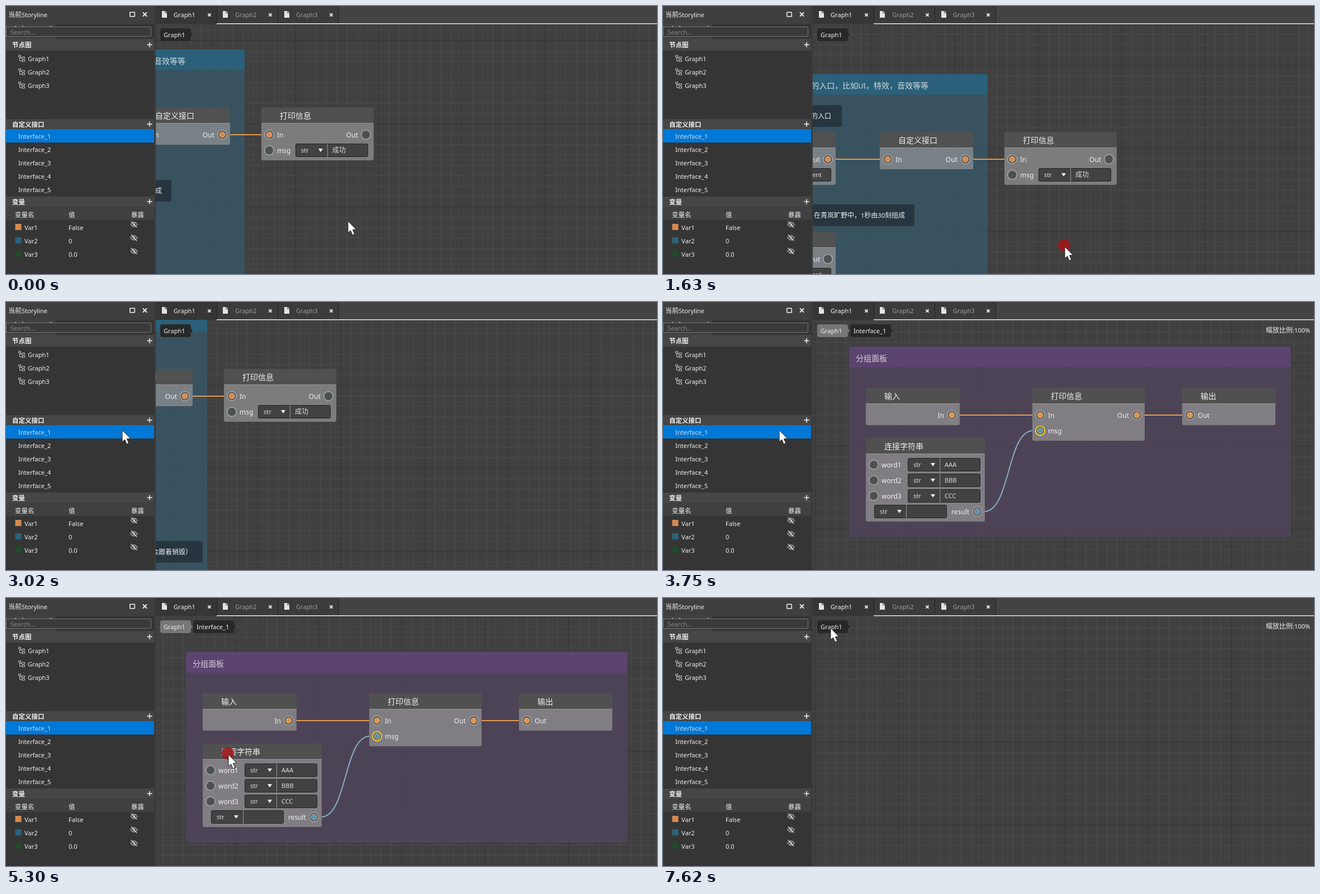
Animation, 1165 px wide and 481 px high, one loop 8 s. Source, as an HTML page with a canvas:

```html
<!DOCTYPE html>
<html lang="zh-CN">
<head>
<meta charset="utf-8">
<title>Node editor</title>
<style>
html, body { margin: 0; height: 100%; overflow: hidden; background: #404040; }
canvas { display: block; }
</style>
</head>
<body>
<canvas id="stage" width="1165" height="481"></canvas>
<script>
const c = document.getElementById('stage').getContext('2d');
const LOOP = 8000, ORANGE = '#e6994a';

// Position keys: [time, x, y]
const mouse = [[790, 612, 386], [860, 634, 368], [1280, 676, 255], [1630, 719, 432],
  [2330, 500, 326], [2400, 513, 312], [3020, 208, 230], [4540, 208, 230], [4950, 409, 264],
  [5020, 409, 264], [5700, 382, 306], [5930, 336, 287], [6190, 336, 287],
  [6500, 372, 190], [6960, 300, 54]];
const mainView = [[860, 457, 182], [1280, 499, 69], [1630, 611, 226], [2330, 390, 120]];
const innerView = [[5020, 333, 80], [5700, 306, 122]];
const presses = [[860, 2330], [3480, 3550], [3620, 3690], [4880, 5700]];

function at(keys, t) {
  if (t <= keys[0][0]) return keys[0].slice(1);
  for (let i = 1; i < keys.length; i++) {
    const [t0, x0, y0] = keys[i - 1], [t1, x1, y1] = keys[i];
    if (t < t1) {
      const k = (t - t0) / (t1 - t0);
      return [Math.round(x0 + (x1 - x0) * k), Math.round(y0 + (y1 - y0) * k)];
    }
  }
  return keys[keys.length - 1].slice(1);
}

function rect(x, y, w, h, fill, r = 0, stroke) {
  c.beginPath();
  c.roundRect(x, y, w, h, r);
  if (fill) { c.fillStyle = fill; c.fill(); }
  if (stroke) { c.strokeStyle = stroke; c.lineWidth = 1; c.stroke(); }
}

function disc(x, y, r, fill, stroke, width = 1.5) {
  c.beginPath();
  c.arc(x, y, r, 0, 7);
  c.fillStyle = fill;
  c.fill();
  if (stroke) { c.strokeStyle = stroke; c.lineWidth = width; c.stroke(); }
}

function path(points, color, width = 1) {
  c.beginPath();
  for (let i = 0; i < points.length; i += 2) c.lineTo(points[i], points[i + 1]);
  c.strokeStyle = color;
  c.lineWidth = width;
  c.stroke();
}

function shape(points, fill) {
  c.beginPath();
  for (let i = 0; i < points.length; i += 2) c.lineTo(points[i], points[i + 1]);
  c.closePath();
  c.fillStyle = fill;
  c.fill();
}

// Latin runs are set slightly smaller than the Chinese ones; y is the middle of the line
function text(s, x, y, { size = 12, color = '#f0f0f0', right = false, bold = '' } = {}) {
  const runs = s.match(/[\x00-\xff]+|[^\x00-\xff]+/g).map(part => {
    const font = part.charCodeAt(0) < 256
      ? `${bold} ${size * .925}px "Noto Sans", sans-serif`
      : `${bold} ${size}px "Noto Sans CJK SC", "Noto Sans CJK", sans-serif`;
    c.font = font;
    return { part, font, w: c.measureText(part).width };
  });
  if (right) x -= runs.reduce((sum, r) => sum + r.w, 0);
  c.fillStyle = color;
  for (const r of runs) {
    c.font = r.font;
    c.fillText(r.part, x, y + size * .36);
    x += r.w;
  }
}

function cross(x, y, r, color = '#eee', width = 1.8) {
  path([x - r, y - r, x + r, y + r], color, width);
  path([x - r, y + r, x + r, y - r], color, width);
}

function plus(x, y) {
  path([x - 4.5, y, x + 4.5, y], '#eee', 1.6);
  path([x, y - 4.5, x, y + 4.5], '#eee', 1.6);
}

function grid(ox, oy) {
  const step = 149 / 8;
  const lines = (o, from, to, draw) => {
    const first = Math.ceil((from - o) / step);
    for (const major of [false, true])
      for (let i = first; o + i * step < to; i++)
        if ((i % 8 === 0) === major) draw(Math.round(o + i * step), major ? '#343434' : '#4b4b4b');
  };
  rect(268, 32, 897, 449, '#404040');
  lines(ox, 268, 1165, (x, col) => rect(x, 33, 1, 448, col));
  lines(oy, 33, 481, (y, col) => rect(268, y, 897, 1, col));
}

function group(x, y, w, h, body, head) {
  rect(x, y, w, h, body, 4);
  rect(x, y, w, 37, head, [4, 4, 0, 0]);
}

function node(x, y, w, h, title) {
  rect(x, y, w, h, 'rgba(150,150,150,.7)', 3);
  rect(x, y, w, 28, 'rgba(78,78,78,.94)', [3, 3, 0, 0]);
  rect(x, y + 28, w, 1, '#989898');
  text(title, x + 33, y + 15, { size: 14 });
}

function port(x, y, label, { out = false, fill = '', ring = '#a9a9a9' } = {}) {
  disc(x, y, 8.2, '#4d5151', ring, ring === '#a9a9a9' ? 1.5 : 2);
  if (fill) disc(x, y, 5, fill, '#d9b99a', 1);
  text(label, out ? x - 14 : x + 14, y + .5, { size: 13, right: out });
}

function field(x, y, value) {
  rect(x + .5, y + .5, 129, 23, '#424242', 2, '#222');
  path([x + 57.5, y, x + 57.5, y + 24], '#969696');
  text('str', x + 10, y + 12, { color: '#ddd' });
  shape([x + 41, y + 9, x + 49, y + 9, x + 45, y + 15], '#eee');
  if (value) text(value, x + 66, y + 12, { color: '#ddd' });
}

function note(right, y, s, pad) {
  rect(right - 420, y, 420, 39, 'rgba(37,52,61,.92)', 3);
  text(s, right - pad, y + 20, { right: true });
}

function mainGraph([x, y]) {
  const on = { fill: '#d98a4c' }, onOut = { fill: '#d98a4c', out: true };
  grid(x + 60, y + 29);
  group(x - 1030, y - 104, 1000, 700, 'rgba(56,87,104,.8)', 'rgba(42,98,126,.9)');
  text('的入口，比如UI，特效，音效等等', x - 136, y - 83, { size: 14, color: '#cfdae0', right: true });
  note(x - 291, y - 48, '的入口', 19);
  note(x - 161, y + 130, '在青岚旷野中，1秒由30刻组成', 17);
  note(x - 38, y + 309, '预设/零件/素材也都会跟着销毁）', 19);

  path([x - 302, y + 49, x - 223, y + 49], ORANGE, 2);
  path([x - 56, y + 49, x, y + 49], ORANGE, 2);
  for (const dy of [0, 179]) {
    node(x - 503, y + dy, 201, 95, '监听');
    port(x - 316, y + dy + 49, 'Out', dy ? { out: true } : onOut);
    rect(x - 439.5, y + dy + 65.5, 129, 23, '#424242', 2, '#222');
    text('Client', x - 327, y + dy + 77, { color: '#ddd', right: true });
  }
  node(x - 223, y, 167, 67, '自定义接口');
  port(x - 209, y + 49, 'In', on);
  port(x - 70, y + 49, 'Out', onOut);

  node(x, y, 201, 95, '打印信息');
  port(x + 14, y + 49, 'In', on);
  port(x + 187, y + 49, 'Out', { out: true });
  port(x + 14, y + 77, 'msg');
  field(x + 61, y + 65, '成功');
}

function innerGraph([x, y], moved) {
  const on = { fill: '#e0944a' }, onOut = { fill: '#e0944a', out: true };
  const blue = moved ? '#4fa9c4' : '#86adc6';
  grid(x + 88, y + 29);
  group(x, y, 790, 342, 'rgba(80,68,92,.82)', 'rgba(94,68,116,.9)');
  text('分组面板', x + 12, y + 21, { size: 14, color: '#d6cfdc' });

  path([x + 198, y + 123, x + 328, y + 123], ORANGE, 2);
  path([x + 529, y + 123, x + 596, y + 123], ORANGE, 2);
  c.beginPath();
  c.moveTo(x + 243, y + 296);
  c.bezierCurveTo(x + 288, y + 294, x + 283, y + 153, x + 328, y + 151);
  c.strokeStyle = blue;
  c.lineWidth = 2;
  c.stroke();

  node(x + 30, y + 74, 168, 67, '输入');
  port(x + 184, y + 123, 'In', onOut);
  node(x + 328, y + 74, 201, 95, '打印信息');
  port(x + 342, y + 123, 'In', on);
  port(x + 515, y + 123, 'Out', onOut);
  port(x + 342, y + 151, 'msg', { fill: '#5596b2', ring: moved ? '#f0a04a' : '#f5cf2a' });
  node(x + 596, y + 74, 167, 67, '输出');
  port(x + 610, y + 123, 'Out', on);

  node(x + 30, y + 164, 213, 150, '连接字符串');
  ['AAA', 'BBB', 'CCC'].forEach((s, i) => {
    port(x + 44, y + 212 + 28 * i, 'word' + (i + 1));
    field(x + 105, y + 200 + 28 * i, s);
  });
  field(x + 45, y + 284, '');
  port(x + 229, y + 296, 'result', { out: true, fill: '#5596b2' });
}

function crumb(x, w, label, fill) {
  rect(x, 40, w, 23, fill, 4);
  shape([x + w, 48, x + w + 3.5, 51.5, x + w, 55], fill);
  text(label, x + 6, 52);
}

function tabs() {
  rect(265, 0, 900, 32, '#434343');
  rect(265, 0, 3, 481, '#3a3a3a');
  rect(268, 0, 109, 32, '#363636');
  rect(377, 0, 218, 31, '#3b3b3b');
  rect(377, 31, 788, 1.5, '#e8e8e8');
  [[268, 300], [377, 410], [487, 519]].forEach(([x, tx], i) => {
    const ix = x + 11;
    shape([ix, 9, ix + 6, 9, ix + 9, 12, ix + 9, 21, ix, 21], '#e4e4e4');
    path([ix + 5.5, 9, ix + 5.5, 12.5, ix + 9, 12.5], '#555');
    text('Graph' + (i + 1), tx, 15.5, { color: i ? '#9c9c9c' : '#f4f4f4' });
    cross([364, 473, 582][i], 16, 2.6);
    rect([377, 486, 595][i], 0, 1, 31, '#272727');
  });
}

function section(y, h, label) {
  rect(0, y, 265, h, '#464646');
  text(label, 11, y + h / 2 + .5, { size: 11.5, bold: 'bold' });
  plus(257, y + h / 2);
}

function treeIcon(x, y) {
  const col = '#c4c4c4';
  rect(x + .5, y - 5.5, 4, 3, '', 0, col);
  rect(x + 6.5, y - 2.5, 5, 3, '', 0, col);
  rect(x + 6.5, y + 2.5, 5, 3, '', 0, col);
  path([x + 2.5, y - 2, x + 2.5, y + 4.5, x + 6, y + 4.5], col);
  path([x + 2.5, y - .5, x + 6, y - .5], col);
}

function eyeIcon(x, y) {
  c.beginPath();
  c.moveTo(x - 6, y);
  c.quadraticCurveTo(x, y - 8, x + 6, y);
  c.quadraticCurveTo(x, y + 8, x - 6, y);
  c.strokeStyle = '#d0d0d0';
  c.lineWidth = 1.2;
  c.stroke();
  disc(x, y, 1.8, '#353535', '#d0d0d0', 1.1);
  path([x - 5, y - 5.5, x + 5, y + 5.5], '#d8d8d8', 1.3);
}

function sidebar() {
  rect(0, 0, 265, 481, '#353535');
  rect(0, 0, 265, 32, '#3f3f3f');
  text('当前Storyline', 4, 15.5);
  rect(222, 11.5, 8, 7, '', 0, '#f0f0f0');
  rect(221.5, 11, 9, 8, '', 0, '#f0f0f0');
  cross(248.5, 15, 3.6, '#f0f0f0', 2);

  rect(0, 32, 88, 27, '#424242');
  for (const [x, w] of [[16, 2], [29, 2], [79, 2]]) rect(x, 36, w, 2, '#ddd');
  rect(.5, 37.5, 259, 17, '#3a3a3a', 0, '#747474');
  text('Search...', 8, 46.5, { color: '#888' });

  section(59, 21, '节点图');
  for (let i = 0; i < 3; i++) {
    treeIcon(22, 94 + 24 * i);
    text('Graph' + (i + 1), 39, 95 + 24 * i);
  }
  section(203, 18, '自定义接口');
  rect(0, 221, 265, 24, '#0078d7');
  for (let i = 0; i < 5; i++)
    text('Interface_' + (i + 1), 22, 233.5 + 24.1 * i, { color: i ? '#f0f0f0' : '#c5e0f5' });

  section(342, 18, '变量');
  rect(0, 360, 265, 24, '#404040');
  text('变量名', 16, 374.5, { size: 11.5 });
  text('值', 112, 374.5, { size: 11.5 });
  text('暴露', 224, 374.5, { size: 11.5 });
  [['#d5894f', 'False'], ['#2a647b', '0'], ['#1f4b2d', '0.0']].forEach(([col, value], i) => {
    const y = 397 + 24 * i;
    rect(16.5, y - 6, 11, 11, col);
    text('Var' + (i + 1), 33, y + .5);
    text(value, 112, y + .5);
    eyeIcon(229, y - 5);
  });
}

function pointer([x, y], pressed) {
  if (pressed) disc(x - 1, y - 2, 11, 'rgba(165,20,24,.85)');
  c.beginPath();
  [[0, 0], [0, 21], [4.6, 17], [8, 25], [11.8, 23.3], [8.4, 15.6], [14.5, 15]]
    .forEach(([dx, dy]) => c.lineTo(x + dx, y + dy));
  c.closePath();
  c.fillStyle = '#fff';
  c.fill();
  c.strokeStyle = '#222';
  c.lineWidth = 1;
  c.stroke();
}

function draw(t) {
  const inside = t >= 3690 && t < 7620;
  c.clearRect(0, 0, 1165, 481);
  if (t < 3690) mainGraph(at(mainView, t));
  else if (inside) innerGraph(at(innerView, t), t >= 5370);
  else grid(421, 109);
  tabs();
  sidebar();
  crumb(276, 55, 'Graph1', inside ? '#777' : '#282828');
  if (inside) crumb(335, 73, 'Interface_1', '#282828');
  if (t >= 7620 || inside && t < 5230) text('缩放比例:100%', 1158, 51, { right: true });
  pointer(at(mouse, t), presses.some(([a, b]) => t >= a && t < b));
}

const start = performance.now();
function tick() {
  draw((performance.now() - start) % LOOP);
  requestAnimationFrame(tick);
}
tick();
</script>
</body>
</html>
```
